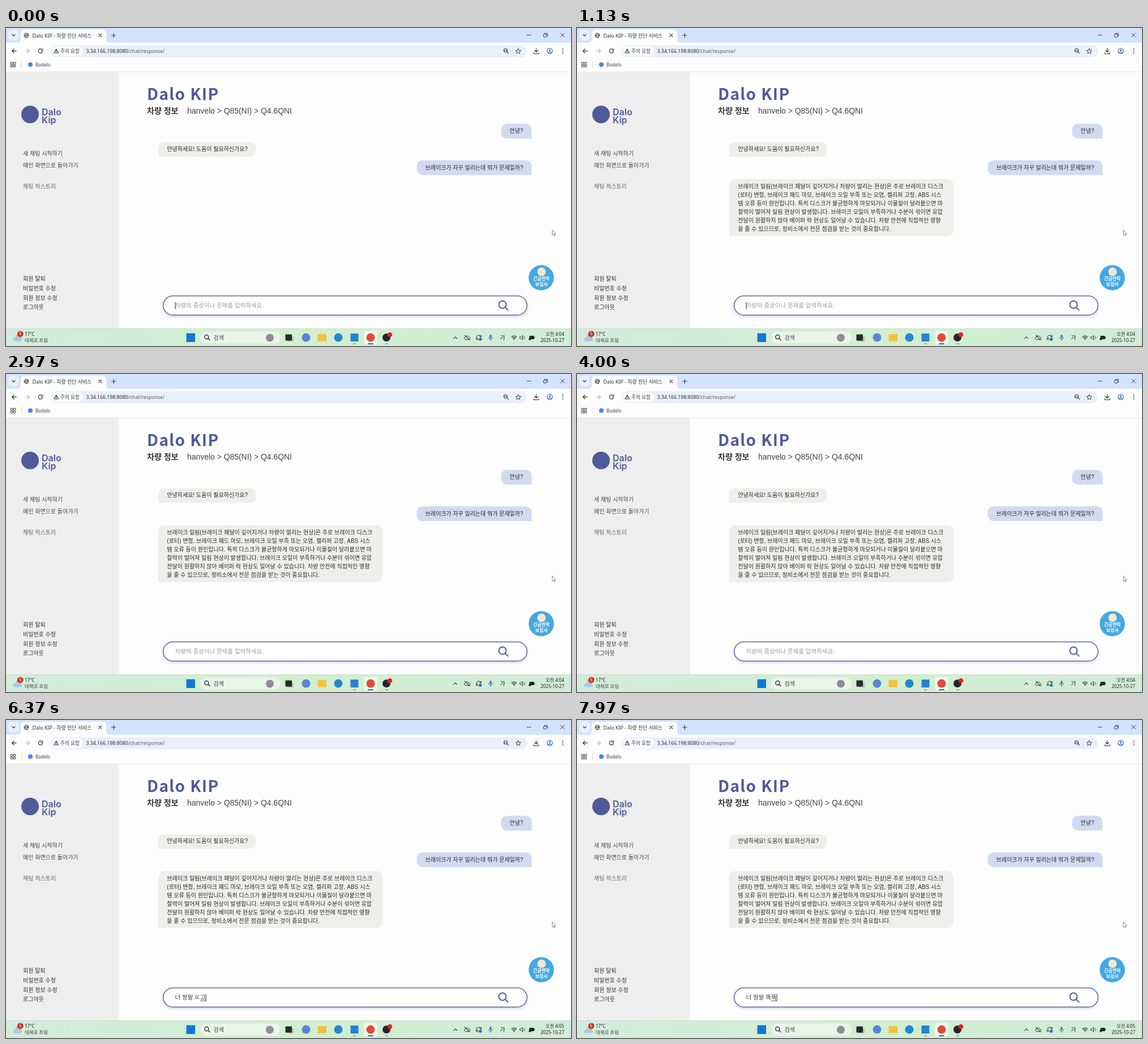
An HTML page with a canvas for the animation above (8 s loop, 998 px wide and 561 px high).

```html
<!DOCTYPE html>
<html lang="ko">
<head>
<meta charset="utf-8">
<title>Dalo KIP</title>
<style>
html, body { margin: 0; width: 100%; height: 100%; overflow: hidden; background: #fdfdfe; }
canvas { display: block; width: 998px; height: 561px; }
</style>
</head>
<body>
<canvas id="stage"></canvas>
<script>
const W = 998, H = 561, LOOP = 8000;
const REPLY_AT = 370, CLOCK_AT = 4700, BLINK = 1060;
const canvas = document.getElementById('stage');
const ctx = canvas.getContext('2d');
const dpr = window.devicePixelRatio || 1;
canvas.width = W * dpr;
canvas.height = H * dpr;

const PAGE = '"Liberation Sans", "Noto Sans CJK KR", "Noto Sans CJK", sans-serif';
const UI = '"Noto Sans", "Noto Sans CJK KR", "Noto Sans CJK", sans-serif';
const CJK = '"Noto Sans CJK KR", "Noto Sans CJK", sans-serif';
const INK = '#3c4043', NAVY = '#4f5a9a';

const reply = [
  '브레이크 밀림(브레이크 페달이 깊어지거나 차량이 떨리는 현상)은 주로 브레이크 디스크',
  '(로터) 변형, 브레이크 패드 마모, 브레이크 오일 부족 또는 오염, 캘리퍼 고장, ABS 시스',
  '템 오류 등이 원인입니다. 특히 디스크가 불균형하게 마모되거나 이물질이 달라붙으면 마',
  '찰력이 떨어져 밀림 현상이 발생합니다. 브레이크 오일이 부족하거나 수분이 섞이면 유압',
  '전달이 원활하지 않아 베이퍼 락 현상도 일어날 수 있습니다. 차량 안전에 직접적인 영향',
  '을 줄 수 있으므로, 정비소에서 전문 점검을 받는 것이 중요합니다.'
];

// Keystrokes: time and resulting input; the last syllable is still composing.
const keys = [
  [4560, 'ㄴ'], [4680, '너'], [4860, '너 '], [5100, '너 ㅈ'], [5230, '너 저'], [5360, '너 정'],
  [5530, '너 정ㅁ'], [5640, '너 정마'], [5760, '너 정말'], [5920, '너 정말 '],
  [6080, '너 정말 ㄸ'], [6200, '너 정말 ㄸㄱ'], [6310, '너 정말 ㄸ고'],
  [6520, '너 정말 ㄸㄱ'], [6640, '너 정말 ㄸ'], [6780, '너 정말 또'], [6920, '너 정말 똑'],
  [7100, '너 정말 똑ㄸ'], [7300, '너 정말 똑또'], [7520, '너 정말 똑똑']
];

function text(s, x, y, size, color, { font = PAGE, weight = 400, align = 'left', spacing = 0 } = {}) {
  ctx.font = `${weight} ${size}px ${font}`;
  ctx.letterSpacing = spacing + 'px';
  ctx.textAlign = align;
  ctx.fillStyle = color;
  ctx.fillText(s, x, y);
}
function box(x, y, w, h, color, r = 0) {
  ctx.beginPath();
  ctx.roundRect(x, y, w, h, r);
  ctx.fillStyle = color;
  ctx.fill();
}
function frame(x, y, w, h, color, lw = 1, r = 0) {
  ctx.beginPath();
  ctx.roundRect(x, y, w, h, r);
  ctx.strokeStyle = color;
  ctx.lineWidth = lw;
  ctx.stroke();
}
function disc(x, y, r, color) {
  ctx.beginPath();
  ctx.arc(x, y, r, 0, 7);
  ctx.fillStyle = color;
  ctx.fill();
}
function arc(x, y, r, color, lw = 1, from = 0, to = Math.PI * 2) {
  ctx.beginPath();
  ctx.arc(x, y, r, from, to);
  ctx.strokeStyle = color;
  ctx.lineWidth = lw;
  ctx.stroke();
}
function path(d, color, lw = 1, fill = null) {
  const p = new Path2D(d);
  if (fill) { ctx.fillStyle = fill; ctx.fill(p); }
  if (color) { ctx.strokeStyle = color; ctx.lineWidth = lw; ctx.stroke(p); }
}
function magnifier(x, y, r, tail, color, lw) {
  arc(x, y, r, color, lw);
  const k = r * 0.71;
  path(`M${x + k} ${y + k}l${tail} ${tail}`, color, lw);
}

function drawTabs() {
  box(0, 0, W, 27, '#d3e3fd');
  box(4, 3, 19, 19, '#e9f0fd', 6);
  path('M11 11.5l2.5 2.5 2.5-2.5', INK, 1.3);
  path('M20 26q6 0 6-6V10q0-7 7-7H170q7 0 7 7V20q0 6 6 6z', null, 0, '#fdfdfe');
  disc(36, 13, 4.5, '#5f6368');
  path('M33 11l3 1 1-2.500M34 16l2-2 3 1', '#f4f6fa', 1.1);
  text('Dalo KIP - 차량 진단 서비스', 46.500, 16.500, 8.9, '#2b2f33', { font: UI });
  path('M163.800 10.500l5 5m0-5l-5 5', INK, 1.1);
  path('M186.500 13h7.500m-3.750-3.750v7.500', INK, 1.2);
  path('M920.500 12.500h7', INK, 1);
  frame(949.500, 11, 5, 5, INK, 1, 1);
  path('M951.500 9.500h5v5', INK, 1);
  path('M979.500 9l7 7m0-7l-7 7', INK, 1);
}

function drawToolbar() {
  box(0, 26, W, 52, '#fdfdfe');
  path('M18 40.500h-7.500m3.500-3.500l-3.500 3.500 3.500 3.500', INK, 1.3);
  path('M34 40.500h7.500m-3.500-3.500l3.500 3.500-3.500 3.500', '#b4b8bd', 1.2);
  arc(61, 40.500, 3.500, INK, 1.2, 0.2, 5.4);
  path('M64.800 36.500v3.300h-3.300', INK, 1.1);
  box(79, 30.500, 841, 21, '#e9eff9', 10.500);
  box(81, 32.500, 55, 17, '#fdfdfe', 8.500);
  path('M88.700 37l4 7h-8z', INK, 1.1);
  path('M88.700 39.200v2.300m0 .8v.9', INK, 0.9);
  text('주의 요함', 96, 44, 8.7, INK, { font: CJK });
  text('3.34.166.198:8080', 141.500, 44, 8.7, '#26292c', { font: UI });
  const host = ctx.measureText('3.34.166.198:8080').width;
  text('/chat/response/', 141.500 + host, 44, 8.7, '#55595e', { font: UI });
  magnifier(882.500, 39.500, 3, 3, INK, 1.2);
  path('M881 39.500h3', INK, 0.8);
  path('M904.800 36.300l1.300 3 3.300.3-2.500 2.200.8 3.200-2.900-1.700-2.900 1.700.8-3.200-2.500-2.200 3.300-.3z', INK, 1);
  path('M936.500 36v6.500m-3-3l3 3 3-3M932.500 43.500v2h8.500v-2', INK, 1.2);
  arc(960.500, 40.500, 4.600, '#2f5fb3', 1.2);
  disc(960.500, 39.200, 1.500, '#2f5fb3');
  path('M957.500 43.500q3-2.500 6 0', '#2f5fb3', 1.2);
  for (const y of [37, 40.500, 44]) disc(983.500, y, 1, INK);
  for (const x of [8.500, 13.500]) for (const y of [60.500, 65.500]) frame(x, y, 3.300, 3.300, INK, 1);
  path('M27.500 59v11', '#cfdcf2', 1);
  disc(43, 64.500, 4, '#4285f4');
  text('Bodelo', 52, 67.500, 8, INK, { font: UI });
  box(0, 77, W, 1, '#e6e8ec');
}

function drawSidebar() {
  box(0, 78, 199.500, 452, '#eeeeee');
  disc(42.500, 152.500, 15.500, NAVY);
  text('Dalo', 63, 153.500, 16, NAVY, { font: 'Inter, sans-serif', weight: 600 });
  text('Kip', 63, 168, 16, NAVY, { font: 'Inter, sans-serif', weight: 600 });
  text('새 채팅 시작하기', 30, 224.800, 10, '#444');
  text('메인 화면으로 돌아가기', 30, 246, 10, '#444');
  text('채팅 히스토리', 30, 282.500, 10, '#666', { weight: 500 });
  ['회원 탈퇴', '비밀번호 수정', '회원 정보 수정', '로그아웃'].forEach((s, i) =>
    text(s, 30, 446.300 + i * 16.700, 10, '#333', { weight: 500 }));
}

function drawChat(t) {
  const mine = '#d0dbef', theirs = '#eeeeed', ink = '#2a2a2a';
  text('Dalo KIP', 249, 126.500, 28, NAVY, { font: CJK, weight: 900, spacing: 1.400 });
  text('차량 정보', 249, 150.500, 14, '#333', { weight: 700 });
  text('hanvelo > Q85(NI) > Q4.6QNI', 320, 150.500, 13.930, '#444');
  box(874.500, 169, 54, 26, mine, [10, 10, 0, 10]);
  text('안녕?', 889.500, 185, 10, ink);
  box(269, 201.500, 172.500, 25.500, theirs, [10, 10, 10, 0]);
  text('안녕하세요! 도움이 필요하신가요?', 284.300, 217, 10, ink);
  box(725.500, 233.500, 203, 26, mine, [10, 10, 0, 10]);
  text('브레이크가 자꾸 밀리는데 뭐가 문제일까?', 740.500, 250, 10, ink);
  if (t < REPLY_AT) return;
  box(269, 266.500, 396, 100.500, theirs, [10, 10, 10, 0]);
  reply.forEach((s, i) => text(s, 284.300, 282.700 + i * 15, 10, ink));
}

function drawInput(t) {
  ctx.save();
  ctx.shadowColor = 'rgba(60,60,110,.25)';
  ctx.shadowBlur = 5 * dpr;
  ctx.shadowOffsetY = 2 * dpr;
  box(277, 472, 644, 35, '#fff', 17.500);
  ctx.restore();
  frame(277.700, 472.700, 642.600, 33.600, '#4d4f8c', 1.300, 16.800);
  magnifier(877, 488, 6.500, 5, NAVY, 2);

  const x = 298.500, y = 493.300, size = 10.500;
  const key = keys.filter(k => k[0] <= t).pop();
  let end = x, since = t + 75;
  if (key) {
    const s = key[1];
    text(s, x, y, size, '#333');
    end = x + ctx.measureText(s).width;
    since = t - key[0];
    if (!s.endsWith(' ')) {
      const start = x + ctx.measureText(s.slice(0, -1)).width;
      box(start, 495, end - start, 0.800, '#333');
    }
  } else {
    text('차량의 증상이나 문제를 입력하세요.', x, y - 0.300, size, '#9b9b9b');
  }
  if (since % BLINK < BLINK / 2) box(end, 483.500, 1, 12.500, '#222');
}

function drawOverlay() {
  disc(945.500, 440.500, 22.300, '#43a8e3');
  disc(946, 430, 7.500, '#f3e7d3');
  text('긴급연락', 945.700, 445.300, 8, '#fff', { font: CJK, weight: 700, align: 'center' });
  text('보험사', 945.700, 455, 8, '#fff', { font: CJK, weight: 700, align: 'center' });
  path('M965 356.500v9l2-1.800 1.300 2.800 1.500-.7-1.300-2.700h2.500z', '#777', 0.900, '#fff');
}

function drawTray(t) {
  path('M790.800 547.800l3-3 3 3', INK, 1.200);
  path('M812 549.500q-2.500-.2-2.500-2.300 0-2 2.200-2.200 1-2.500 3.500-2t2.700 2.600q2 .2 2 2t-2 1.900z', INK, 1);
  path('M810.500 542l8.500 8.500', INK, 1.100);
  arc(835, 546, 4, INK, 1.100, 3.400, 6);
  arc(835, 546, 4, INK, 1.100, 0.300, 2.900);
  path('M839.500 542v3h-3M830.500 550v-3h3', INK, 1);
  disc(838, 549, 2.600, '#1a73c8');
  box(854.500, 541, 3, 6, '#2c6fb8', 1.500);
  path('M852.500 545.500q.2 3.500 3.500 3.500t3.500-3.500M856 549v2.500', '#2c6fb8', 1);
  text('가', 877, 549.700, 10, '#222', { font: CJK, align: 'center' });
  for (const r of [2.500, 4.500, 6.500]) arc(897.500, 549.500, r, INK, 1.100, -2.350, -0.790);
  disc(897.500, 549, 1, INK);
  path('M908 544.800h1.800l2.700-2.300v7.500l-2.700-2.300H908z', INK, 1);
  arc(912.500, 546.200, 2.800, INK, 0.800, -0.800, 0.800);
  arc(912.500, 546.200, 4.800, '#8ca092', 0.800, -0.700, 0.700);
  box(924.500, 543, 8.500, 6, '#222', 1.500);
  box(933.300, 545, 1, 2, '#222');
  disc(925.500, 548.500, 2.200, '#222');
  text(t < CLOCK_AT ? '오전 4:04' : '오전 4:05', 986, 543.300, 8, '#222', { font: UI, align: 'right' });
  text('2025-10-27', 986, 553.500, 8, '#222', { font: UI, align: 'right' });
}

function drawTaskbar(t) {
  const g = ctx.createLinearGradient(0, 0, W, 0);
  g.addColorStop(0, '#d2ecdc');
  g.addColorStop(0.500, '#d2efcf');
  g.addColorStop(1, '#d1ecd8');
  box(0, 530, W, 31, g);
  box(0, 530, W, 0.800, '#c4d8c8');

  disc(22, 545, 5, '#f3a93b');
  path('M16 552.500q-3.500-.3-3.500-3.300 0-2.700 3-3 1.500-3 4.700-2.500 2.800.5 3.500 3 4-.3 4.300 2.800.2 2.800-3 3z', null, 0, '#a9c7ee');
  disc(25.300, 539.500, 5.300, '#c42b1c');
  text('6', 25.300, 542.400, 8, '#fff', { font: UI, align: 'center' });
  text('17°C', 33, 543.300, 8, '#222', { font: UI });
  text('대체로 흐림', 33, 553.700, 8.500, '#444', { font: CJK });

  box(318.500, 538.500, 15.500, 15.500, '#0f78d4');
  box(343, 535.500, 142, 21, '#e8f6e8', 10.500);
  magnifier(354.300, 545, 3.600, 3, '#222', 1.300);
  text('검색', 366.500, 549.500, 10, '#444', { font: CJK });
  disc(466, 546.500, 7, '#938b98');
  box(497.500, 544, 10.500, 9, '#b9bfbc', 1);
  box(493.500, 540.500, 11.500, 11, '#272a2b', 1);
  disc(530, 546, 7.500, '#5b83dc');
  box(550.500, 540, 15.500, 12.500, '#f3c13f');
  disc(587, 546, 7.500, '#2389c9');
  box(608.500, 539, 14, 14, '#2384d0');
  box(632.500, 534.500, 23, 23.500, '#eef8ee', 3);
  disc(644, 546, 7.500, '#df4b3b');
  disc(672, 546, 7, '#26262a');
  disc(678, 541, 4.300, '#e0242b');
  box(613, 556.500, 5, 1.600, '#80928a', 0.800);
  box(639, 556.300, 10, 1.800, '#1669b5', 0.900);
  box(670, 556.500, 5, 1.600, '#80928a', 0.800);
  drawTray(t);
}

function draw(now) {
  const t = now % LOOP;
  ctx.setTransform(dpr, 0, 0, dpr, 0, 0);
  ctx.lineCap = 'round';
  ctx.lineJoin = 'round';
  box(0, 0, W, H, '#fdfdfe');
  drawTabs();
  drawToolbar();
  drawSidebar();
  drawChat(t);
  drawInput(t);
  drawOverlay();
  drawTaskbar(t);
}

const start = performance.now();
function tick() {
  draw(performance.now() - start);
  requestAnimationFrame(tick);
}
tick();
</script>
</body>
</html>
```
